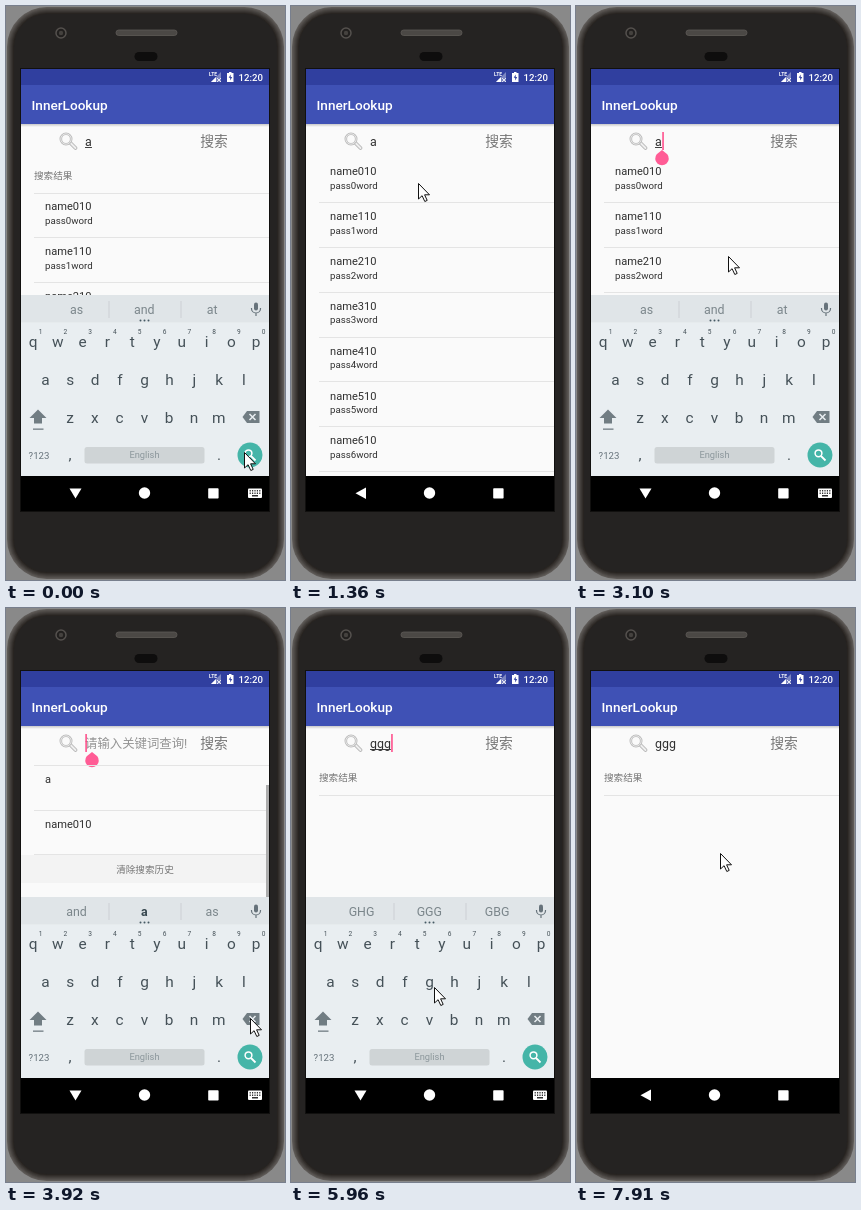
Animation of 279x574 px, one loop 8 s. Source, as an HTML page:

```html
<!DOCTYPE html>
<html lang="zh-CN">
<head>
<meta charset="utf-8">
<style>
  html, body { margin: 0; width: 100%; height: 100%; overflow: hidden; background: #898989; }
  svg { display: block; width: 279px; height: 574px; }
  text { font-family: Roboto, "Noto Sans CJK SC", "Noto Sans CJK", sans-serif; white-space: pre; }
</style>
</head>
<body>
<svg id="stage" viewBox="0 0 279 574" xmlns="http://www.w3.org/2000/svg"></svg>
<script>
const LOOP = 8000;
const FIELD_X = 79;
const ROW = 44.85;
const KEY = 24.8;
const BLINK = 500;

// Moments of the user's actions, in ms.
const SUBMIT = 150, FOCUS = 2710, CLEAR = 3800, TYPE = 5600, SUBMIT_AGAIN = 7230;
const KEYSTROKE = 180;

const pointerStart = { x: 238, y: 446 };
const pointerMoves = [
  { from: 640, to: 1360, x: 127, y: 177 },
  { from: 1760, to: 1890, x: 107, y: 172 },
  { from: 2190, to: 2430, x: 122, y: 136 },
  { from: 2980, to: 3250, x: 195, y: 409 },
  { from: 3250, to: 3650, x: 244, y: 410 },
  { from: 4060, to: 4310, x: 78, y: 409 },
  { from: 4400, to: 4820, x: 143, y: 379 },
  { from: 6200, to: 6560, x: 245, y: 452 },
  { from: 7680, to: 7910, x: 144, y: 245 }
];

const ramp = (t, from, to) => Math.min(1, Math.max(0, (t - from) / (to - from)));
const ease = (t, from, to) => { const p = ramp(t, from, to); return p * p * (3 - 2 * p); };

function pointerAt(t) {
  return pointerMoves.reduce((p, move) => {
    const k = ease(t, move.from, move.to);
    return { x: p.x + (move.x - p.x) * k, y: p.y + (move.y - p.y) * k };
  }, pointerStart);
}

function stateAt(t) {
  const list = t < CLEAR ? 'results' : t < TYPE ? 'history' : 'empty';
  const typed = Math.min(3, 1 + Math.floor((t - TYPE) / KEYSTROKE));
  const focused = t >= FOCUS && t < SUBMIT_AGAIN + BLINK;
  const lastEdit = t < CLEAR ? FOCUS : t < TYPE ? CLEAR : TYPE + (typed - 1) * KEYSTROKE;
  const hidden = t < FOCUS
    ? ramp(t, SUBMIT - 100, SUBMIT + 120) * (t >= SUBMIT)
    : 1 - ramp(t, FOCUS + 60, FOCUS + 390) + ramp(t, SUBMIT_AGAIN - 100, SUBMIT_AGAIN + 120) * (t >= SUBMIT_AGAIN);
  return {
    list,
    query: { results: 'a', history: '', empty: 'g'.repeat(Math.max(0, typed)) }[list],
    typing: t < SUBMIT || (t >= FOCUS && t < SUBMIT_AGAIN),
    caret: focused && Math.floor((t - lastEdit) / BLINK) % 2 === 0,
    handle: t >= FOCUS && t < 4460,
    scroll: { results: 35 * ease(t, 300, 510), history: 30, empty: 0 }[list],
    bar: { results: ramp(t, 300, 500) - ramp(t, 1000, 1360), history: 1 - ramp(t, 4400, 4700), empty: 0 }[list],
    drop: 182 * hidden,
    words: t < CLEAR ? 'as and at' : t < 4700 ? 'and a as' : t < TYPE ? '' : 'GHG GGG GBG',
    pointer: pointerAt(t)
  };
}

const text = (x, y, size, fill, content, extra = '') =>
  `<text x="${x}" y="${y}" font-size="${size}" fill="${fill}" ${extra}>${content}</text>`;
const mid = (x, y, size, fill, content, extra = '') =>
  text(x, y, size, fill, content, `text-anchor="middle" ${extra}`);
const rect = (x, y, w, h, fill, extra = '') =>
  `<rect x="${x}" y="${y}" width="${w}" height="${h}" fill="${fill}" ${extra}/>`;
const circle = (x, y, r, fill, extra = '') =>
  `<circle cx="${x}" cy="${y}" r="${r}" fill="${fill}" ${extra}/>`;
const path = (d, fill, extra = '') => `<path d="${d}" fill="${fill}" ${extra}/>`;
const stroke = (d, color, width, extra = '') =>
  path(d, 'none', `stroke="${color}" stroke-width="${width}" ${extra}`);
const repeat = (n, draw) => Array.from({ length: n }, (_, i) => draw(i)).join('');
const shifted = (x, y, content) => `<g transform="translate(${x} ${y})">${content}</g>`;
const divider = y => rect(28, y, 235, 1, '#e4e4e4');

function phone() {
  const rim = repeat(7, i => {
    const shade = 94 - i * 9;
    return rect(1 + i, 1 + i, 277 - 2 * i, 572 - 2 * i, `rgb(${shade},${shade - 4},${shade - 7})`, `rx="${40 - i}"`);
  });
  return rim +
    rect(8, 8, 263, 558, '#252322', 'rx="33"') +
    circle(55, 27, 5, '#22201f', 'stroke="#55514e" stroke-width="1.5"') +
    circle(55, 27, 2.2, '#45423f') +
    rect(110, 24, 61, 5.5, '#4b4845', 'rx="2.7" stroke="#5f5b57" stroke-width=".8"') +
    rect(128.5, 46, 23, 9, '#0e0d0d', 'rx="4.5"') +
    rect(14, 62, 250, 444, '#11100f');
}

function appBars() {
  return rect(15, 63, 248, 16, '#303f9f') +
    rect(15, 79, 248, 39, '#3f51b5') +
    rect(15, 118, 248, 3, 'url(#shade)') +
    text(203, 70, 5, '#fff', 'LTE', 'font-weight="700"') +
    path('M205 76 L215 66 V76Z', '#7c86c2') +
    path('M205 76 L210 71 V76Z', '#fff') +
    stroke('M211 72 l4 4 m0 -4 l-4 4', '#fff', .8) +
    path('M221 67 h2 v-1 h2.500 v1 h2 v9 h-6.500Z', '#fff') +
    path('M224.700 68.500 l-2 3.300 h1.500 v2.700 l2 -3.500 h-1.500Z', '#303f9f') +
    text(232.5, 75, 9.65, '#fff', '12:20', 'font-weight="500"') +
    text(25.5, 103.5, 13.6, '#fff', 'InnerLookup', 'font-weight="500"');
}

function searchIcon() {
  const handle = 'M64 136.500 L69.500 142';
  return stroke(handle, '#b4b4b4', 3.8, 'stroke-linecap="round"') +
    stroke(handle, '#efefef', 2, 'stroke-linecap="round"') +
    circle(60, 133, 5.2, '#fafafa', 'stroke="#bcbcbc" stroke-width="2.6"') +
    circle(60, 133, 5.2, 'none', 'stroke="#e6e6e6" stroke-width="1"');
}

function searchRow({ query, typing, caret, handle }) {
  const width = query.length * 6.95;
  const end = FIELD_X + width;
  return searchIcon() +
    text(194.3, 140, 13.8, '#757575', '搜索') +
    (query ? text(FIELD_X, 139.5, 12.4, '#303030', query) : text(FIELD_X, 139.5, 12.4, '#949494', '请输入关键词查询!')) +
    (typing ? rect(FIELD_X, 141, width, 1, '#404040') : '') +
    (caret ? rect(end + .3, 126, 1.6, 18, '#ff4081', 'opacity=".9"') : '') +
    (handle ? path('M86 144 L91.300 148.300 A6.800 6.800 0 1 1 80.700 148.300Z', '#ff5c95') : '');
}

function resultRow(i) {
  const y = 204.3 + i * ROW;
  return text(39, y, 11.1, '#303030', `name${i}10`) +
    text(39, y + 13.6, 9.7, '#303030', `pass${i}word`) +
    divider(Math.round(y + 26.7));
}

function historyRows() {
  return text(39, 205, 11.1, '#303030', 'a') + divider(232) +
    text(39, 249.5, 11.1, '#303030', 'name010') + divider(276) +
    rect(15, 277, 248, 28, '#f3f3f3') +
    mid(139, 294.5, 9.65, '#757575', '清除搜索历史');
}

function listArea({ list, scroll, bar }) {
  const rows = { results: () => repeat(8, resultRow), history: historyRows, empty: () => '' }[list]();
  const [barY, barHeight] = list === 'history' ? [177, 112] : [164, 107];
  return '<g clip-path="url(#listClip)">' +
    shifted(0, -scroll, text(28, 173, 9.65, '#757575', '搜索结果') + divider(187) + rows) +
    rect(260, barY, 3, barHeight, '#acacac', `opacity="${bar}"`) + '</g>';
}

function suggestions(words) {
  if (!words) return mid(138.5, 307.5, 10.4, '#37474f', 'Suggest contact names? Touch for info.');
  const labels = words.split(' ').map((word, i) => word === 'a'
    ? mid(70.5 + i * 67.8, 308, 12.4, '#37474f', word, 'font-weight="700"')
    : mid(70.5 + i * 67.8, 308, 12.4, '#7b868b', word));
  return labels.join('') +
    repeat(2, i => rect(102.5 + i * 72, 295, 1, 17, '#cbd0d3')) +
    repeat(3, i => circle(134.5 + i * 4, 314.5, 1, '#455a64'));
}

function suggestionBar(words) {
  return rect(15, 289, 248, 28, '#e0e5e8') + rect(15, 316.5, 248, 1, '#eef2f4') +
    suggestions(words) +
    rect(248, 296.5, 4, 8, '#66727a', 'rx="2"') +
    stroke('M245.500 302 v.5 a4.500 4.500 0 0 0 9 0 v-.5 M250 307 v3', '#66727a', 1.2);
}

const keyRow = (letters, x, y, size = 15.4) =>
  repeat(letters.length, i => mid(x + i * KEY, y, size, '#455158', letters[i]));

function keyboard() {
  return rect(15, 317, 248, 153, '#e9eef1') +
    keyRow('1234567890', 34.5, 327.5, 6.6) +
    keyRow('qwertyuiop', 27, 340.5) +
    keyRow('asdfghjkl', 39.5, 378.5) +
    keyRow('zxcvbnm', 64, 416.5) +
    path('M32 403.500 L40.500 412 H36 V417.500 H28 V412 H23.500Z', '#717d83') +
    rect(27, 422.5, 10.5, 1.3, '#717d83') +
    path('M236.500 411 L241 405 H253.500 V417 H241Z', '#717d83') +
    stroke('M243.500 408 l6 6 m0 -6 l-6 6', '#e9eef1', 1.5) +
    mid(33, 452.5, 9.65, '#66727a', '?123') +
    mid(64, 454, 15.4, '#455158', ',') +
    rect(78.5, 441, 120, 16.5, '#cfd4d6', 'rx="2.5"') +
    mid(138.5, 452.3, 9.3, '#8c979c', 'English') +
    mid(213, 454, 15.4, '#455158', '.') +
    circle(244, 449, 12.5, '#45b5a8') +
    circle(242.5, 447.3, 3.4, 'none', 'stroke="#fff" stroke-width="1.5"') +
    stroke('M245 450 l4.500 4.500', '#fff', 1.8);
}

function keyboardIcon() {
  return rect(242, 482.5, 14, 9.5, '#fff', 'rx="1"') +
    repeat(10, i => rect(243.6 + (i % 5) * 2.4, i < 5 ? 484.2 : 486.6, 1.2, 1.2, '#000')) +
    rect(246, 489.2, 6, 1.2, '#000');
}

function navBar(typing) {
  return rect(15, 470, 248, 35, '#000') +
    path(typing ? 'M63.500 482.500 H75.500 L69.500 492.500Z' : 'M75 481.500 V493 L64.500 487.200Z', '#fff') +
    circle(138.5, 487, 5.7, '#fff') +
    rect(202.2, 482.2, 10.4, 10.4, '#fff', 'rx=".8"') +
    (typing ? keyboardIcon() : '');
}

function draw(s) {
  const arrow = path('M.5 .5 V16 L4.100 12.700 L6.800 18.500 L9.200 17.400 L6.600 11.800 H11.500Z', '#fff', 'stroke="#111"');
  return searchRow(s) + listArea(s) +
    `<g clip-path="url(#screenClip)">${shifted(0, s.drop, suggestionBar(s.words) + keys)}</g>` +
    navBar(s.typing) +
    shifted(Math.round(s.pointer.x), Math.round(s.pointer.y), arrow);
}

const keys = keyboard();
const stage = document.getElementById('stage');
stage.innerHTML = `<defs>
  <linearGradient id="shade" x2="0" y2="1"><stop stop-opacity=".2"/><stop offset="1" stop-opacity="0"/></linearGradient>
  <clipPath id="listClip">${rect(15, 154, 248, 316, '#000')}</clipPath>
  <clipPath id="screenClip">${rect(15, 63, 248, 407, '#000')}</clipPath>
</defs>${phone()}${rect(15, 117, 248, 353, '#fafafa')}${appBars()}<g id="live"></g>`;
const live = document.getElementById('live');

let start;
function tick(now) {
  start ??= now;
  live.innerHTML = draw(stateAt((now - start) % LOOP));
  requestAnimationFrame(tick);
}
live.innerHTML = draw(stateAt(0));
requestAnimationFrame(tick);
</script>
</body>
</html>
```
